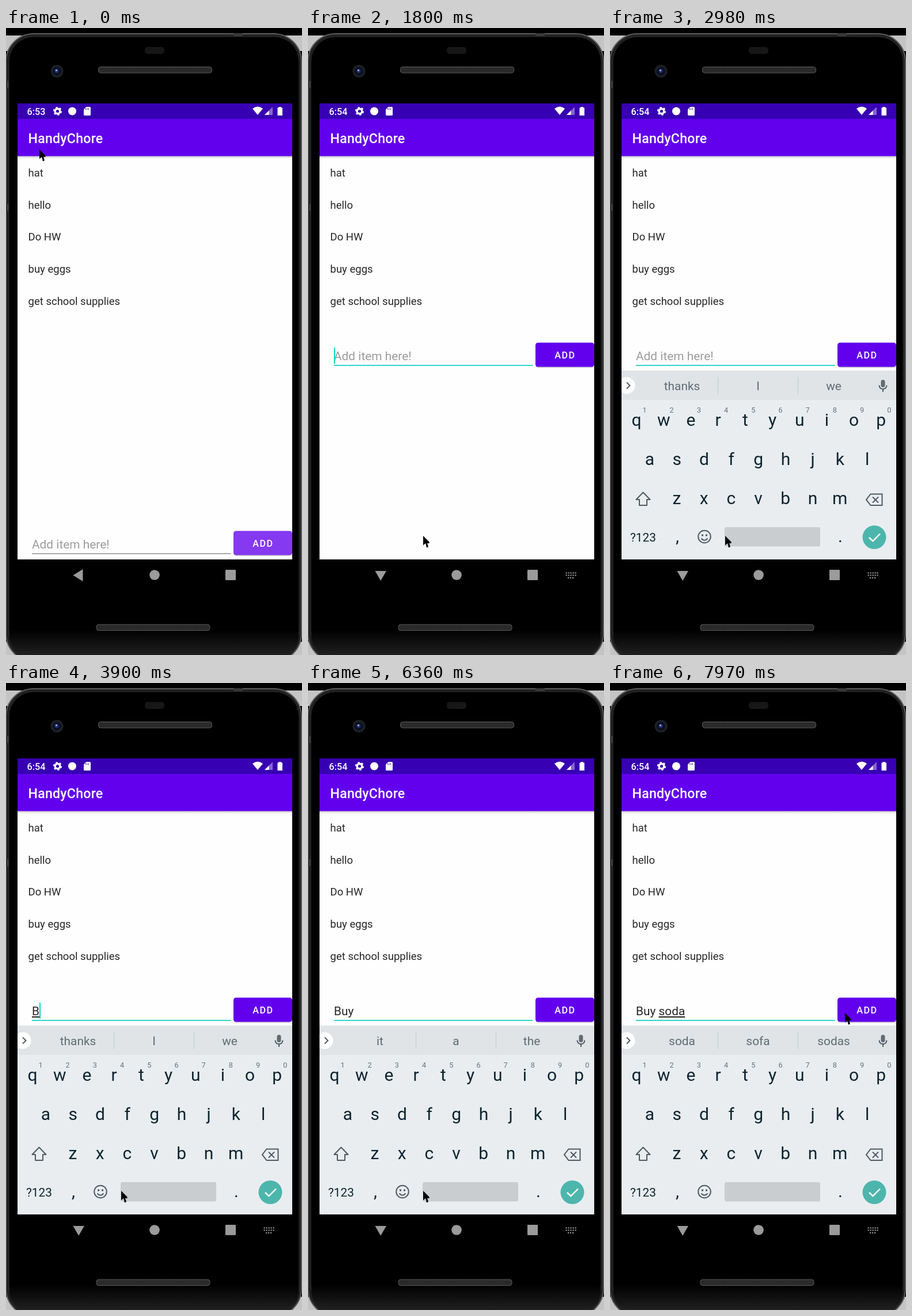
These frames come from a looping animation (514 by 1089 pixels, 8 s). An HTML page:

```html
<!DOCTYPE html>
<html lang="en">
<head>
<meta charset="utf-8">
<title>To-do list</title>
<style>
  html, body { margin: 0; width: 100%; height: 100%; overflow: hidden; background: #000; }
  svg { display: block; width: 100vw; height: 100vh; font-family: Roboto, sans-serif; }
  text { white-space: pre; }
  .mid { text-anchor: middle; }
  .medium { font-weight: 500; fill: #fff; }
  .line { fill: none; stroke: #4c5b62; stroke-width: 2; }
  .item { font-size: 18.55px; fill: #262626; }
  .field { font-size: 20.87px; }
  .key { font-size: 30px; fill: #0c2430; }
  .small { font-size: 12.75px; fill: #66747a; }
  .word { font-size: 20.87px; fill: #5f6c72; }
  #composing { text-decoration: underline; text-decoration-skip-ink: none; }
</style>
</head>
<body>
<svg viewBox="0 0 514 1089" preserveAspectRatio="none">
  <defs>
    <linearGradient id="chin" x2="0" y2="1">
      <stop offset="0" stop-color="#000"/><stop offset="1" stop-color="#202020"/>
    </linearGradient>
    <linearGradient id="shade" x2="0" y2="1">
      <stop offset="0" stop-color="#c4c4c4"/><stop offset="1" stop-color="#fefefe"/>
    </linearGradient>
    <pattern id="mesh" width="3" height="3" patternUnits="userSpaceOnUse">
      <rect width="3" height="3" fill="#303030"/><circle cx="1.5" cy="1.5" r="1" fill="#1c1c1c"/>
    </pattern>
    <clipPath id="screen"><rect x="20" y="131" width="477" height="792"/></clipPath>
  </defs>

  <!-- phone -->
  <path d="M0 13H36V40H0ZM484 13H514V40H484ZM0 1066H30V1089H0ZM490 1066H514V1089H490Z" fill="#c4c4c4"/>
  <rect x="0" y="10" width="513" height="1090" rx="48" fill="#202020" stroke="#5c5c5c" stroke-width="2"/>
  <rect x="5" y="15" width="504" height="1074" rx="43" fill="#000" stroke="#2e2e2e"/>
  <path d="M6 1045H508V1060Q505 1089 470 1089H44Q10 1089 6 1060Z" fill="url(#chin)"/>
  <path d="M0 92H5V104H0ZM0 306H5V318H0ZM395 9H411V14H395Z" fill="#383838"/>
  <rect x="241" y="33" width="34" height="12" rx="5" fill="#171717"/>
  <circle cx="88.500" cy="75" r="11" fill="#1d2024"/>
  <circle cx="88.500" cy="75" r="7.500" fill="#0c1022"/>
  <circle cx="88" cy="74.500" r="3.500" fill="#22306f"/>
  <circle cx="87.500" cy="73.500" r="1.500" fill="#a5b4ea"/>
  <g fill="url(#mesh)" stroke="#5a5a5a">
    <rect x="160.500" y="67.500" width="197" height="10.500" rx="4"/>
    <rect x="157" y="1036" width="197" height="10.500" rx="4"/>
  </g>

  <!-- app -->
  <g clip-path="url(#screen)">
    <rect x="20" y="131" width="478" height="792" fill="#fefefe"/>
    <rect x="20" y="222" width="478" height="5" fill="url(#shade)"/>
    <rect x="20" y="131" width="478" height="28" fill="#3700b3"/>
    <rect x="20" y="158" width="478" height="64.500" fill="#6200ee"/>
    <text id="clock" class="medium" x="36.500" y="150.500" font-size="16.240"></text>
    <g fill="none" stroke="#fff">
      <circle cx="89.500" cy="144.500" r="4.300" stroke-width="3.400"/>
      <circle cx="89.500" cy="144.500" r="6.600" stroke-width="2" stroke-dasharray="3.456"/>
    </g>
    <g fill="#fff">
      <circle cx="115" cy="144.500" r="7"/>
      <path d="M139.500 137H145.500Q147 137 147 138.500V150.500Q147 152 145.500 152H136.500Q135 152 135 150.500V141.500Z"/>
      <path d="M428 140Q437 133 446 140L437 151Z"/>
      <path d="M463 137V151H449Z" opacity=".4"/>
      <path d="M456.500 143.500V151H449Z"/>
      <path d="M473.500 137H478V138.500H480V152H471.500V138.500H473.500Z"/>
    </g>
    <path d="M138.500 139.500V142M141 139.500V142M143.500 139.500V142" stroke="#3700b3"/>
    <text class="medium" x="38.500" y="199.500" font-size="23.200" letter-spacing=".2">HandyChore</text>
    <g id="items"></g>

    <g id="entry">
      <text id="hint" class="field" x="45" y="904" fill="#9c9c9c">Add item here!</text>
      <text id="typed" class="field" x="45" y="904" fill="#262626"><tspan id="done"></tspan><tspan id="composing"></tspan></text>
      <path id="rule" d="M45 913H390.500"/>
      <rect id="caret" y="882" width="2" height="28" fill="#03dac5"/>
      <rect x="395" y="875" width="102" height="42" rx="5" fill="#000" opacity=".2"/>
      <rect id="button" x="395" y="873.500" width="102" height="42" rx="4.500"/>
      <text class="medium mid" x="446.500" y="901" font-size="16.240" letter-spacing="1.450">ADD</text>
    </g>

    <g id="keyboard">
      <rect x="20" y="595" width="478" height="328" fill="#e9edf0"/>
      <rect x="20" y="595" width="478" height="51" fill="#e0e4e7"/>
      <circle cx="29" cy="621" r="14.500" fill="#fff"/>
      <path class="line" d="M29 615.500L34.500 621L29 626.500"/>
      <path d="M187.500 606.500V636M326.500 606.500V636" stroke="#c3c9cc"/>
      <g id="words"></g>
      <rect x="470.500" y="611" width="7" height="13" rx="3.500" fill="#5f6c72"/>
      <path class="line" d="M467.500 620.500Q468 627 474 627T480.500 620.500M474 627V632"/>
      <g id="keys"></g>
      <path class="line" d="M57.500 806.500L69.500 819H64V829H51V819H45.500Z" stroke-linejoin="round"/>
      <path class="line" d="M452.500 809.500H472.500V829H452.500L445 819.200ZM456 814.500L466 824.500M466 814.500L456 824.500"/>
      <circle class="line" cx="164" cy="883.500" r="10.800"/>
      <path class="line" d="M158.500 886.500Q164 893 169.500 886.500"/>
      <path d="M159 881H162M166 881H169" stroke="#4c5b62" stroke-width="3"/>
      <rect x="199" y="867" width="166" height="33.500" rx="3" fill="#c9cdd0"/>
      <circle cx="459" cy="884.500" r="20.500" fill="#4db6ac"/>
      <path d="M450 885L456.500 891L469 878.500" fill="none" stroke="#fff" stroke-width="2.400"/>
    </g>
  </g>

  <!-- navigation -->
  <g fill="#9b9b9b">
    <path id="back"/>
    <circle cx="258" cy="950" r="8.800"/>
    <rect x="381" y="941" width="18" height="18" rx="1"/>
    <path id="switcher" d="M447.500 946.500H466M447.500 950.500H466M451 955H462" stroke="#9b9b9b" stroke-width="2" stroke-dasharray="2.300 1.700"/>
  </g>
  <path id="pointer" d="M0 0V16.500L4 13L5.500 17.500V20H8.500V17L7 13H10.500V10.500Z"/>
</svg>

<script>
const $ = id => document.getElementById(id);
const LOOP = 8000;
const PITCH = 47.2;

function addText(parent, content, x, y, className) {
  const node = document.createElementNS("http://www.w3.org/2000/svg", "text");
  node.textContent = content;
  node.setAttribute("x", x);
  node.setAttribute("y", y);
  node.setAttribute("class", className);
  return $(parent).appendChild(node);
}

["hat", "hello", "Do HW", "buy eggs", "get school supplies"]
  .forEach((item, i) => addText("items", item, 38.5, 258 + i * 55.7, "item"));

[["qwertyuiop", 46, 691], ["asdfghjkl", 69, 759], ["zxcvbnm", 116, 827]].forEach(([row, x, y]) =>
  [...row].forEach((letter, i) => addText("keys", letter, x + i * PITCH, y, "key mid")));
[..."1234567890"].forEach((digit, i) => addText("keys", digit, 60 + i * PITCH, 668, "small mid"));
addText("keys", "?123", 57.5, 891.5, "key mid").style.fontSize = "20.87px";
addText("keys", ",", 117, 893, "key mid");
addText("keys", ".", 400, 893, "key mid");

const words = [125, 257, 388.5].map(x => addText("words", "", x, 628.5, "word mid"));

// Each step changes part of the state and holds until the next one.
const steps = [
  [0, { pointer: [58, 211], clock: "6:53", done: "", composing: "", caret: false, focus: false,
        raised: false, keyboard: 0, words: "thanks I we" }],
  [120, { pointer: [75, 262] }],
  [260, { pointer: [128, 400], clock: "6:54" }],
  [400, { pointer: [186, 545] }],
  [570, { pointer: [211, 611] }],
  [850, { pointer: [208, 690] }],
  [980, { pointer: [203, 810] }],
  [1110, { pointer: [200, 882] }],
  [1400, { focus: true }],
  [1530, { caret: true }],
  [1800, { raised: true }],
  [1940, { keyboard: 0.93, caret: false }],
  [2060, { keyboard: 1 }],
  [2440, { caret: true }],
  [2980, { caret: false }],
  [3510, { caret: true }],
  [3900, { composing: "B" }],
  [4030, { composing: "Bu" }],
  [4170, { words: "Bu Buy But" }],
  [4450, { composing: "Buys", words: "Buys Buy's Buts" }],
  [5010, { caret: false }],
  [5260, { composing: "Buy", caret: true }],
  [5400, { words: "Buy Buys Buying" }],
  [5700, { done: "Buy ", composing: "" }],
  [5820, { words: "it a the" }],
  [6360, { caret: false }],
  [6790, { composing: "s", caret: true }],
  [6920, { composing: "so", words: "so some something" }],
  [7060, { composing: "sod", words: "sod soda side" }],
  [7190, { composing: "soda", words: "soda sofa sodas" }],
  [7700, { caret: false }],
  [7830, { pointer: [310, 720] }],
  [7970, { pointer: [408, 573] }]
];

const show = (id, visible) => $(id).setAttribute("visibility", visible ? "visible" : "hidden");

function render(s) {
  const empty = !s.done && !s.composing;
  $("pointer").setAttribute("transform", `translate(${s.pointer})`);
  $("clock").textContent = s.clock;
  $("done").textContent = s.done;
  $("composing").textContent = s.composing;
  show("hint", empty);
  show("caret", s.caret);
  $("caret").setAttribute("x", 45 + (empty ? 0 : $("typed").getComputedTextLength()));
  $("entry").setAttribute("transform", `translate(0 ${s.raised ? -327 : 0})`);
  $("rule").setAttribute("stroke", s.focus ? "#2fd8c8" : "#8c8c8c");
  $("rule").setAttribute("stroke-width", s.focus ? 2 : 1.3);
  $("button").setAttribute("fill", s.focus ? "#6200ee" : "#8539f1");
  $("keyboard").setAttribute("opacity", s.keyboard);
  $("keyboard").setAttribute("transform", `translate(0 ${s.keyboard < 1 ? 0.8 : 0})`);
  s.words.split(" ").forEach((word, i) => words[i].textContent = word);
  $("back").setAttribute("d", s.raised ? "M116.500 943H136L126.200 960Z" : "M116.500 950.500L133.500 940V961Z");
  show("switcher", s.raised);
}

let current = -1;
function tick(now) {
  const time = now % LOOP;
  const index = steps.filter(([start]) => start <= time).length - 1;
  if (index !== current) {
    current = index;
    render(Object.assign({}, ...steps.slice(0, index + 1).map(([, change]) => change)));
  }
  requestAnimationFrame(tick);
}
tick(0);
</script>
</body>
</html>
```
